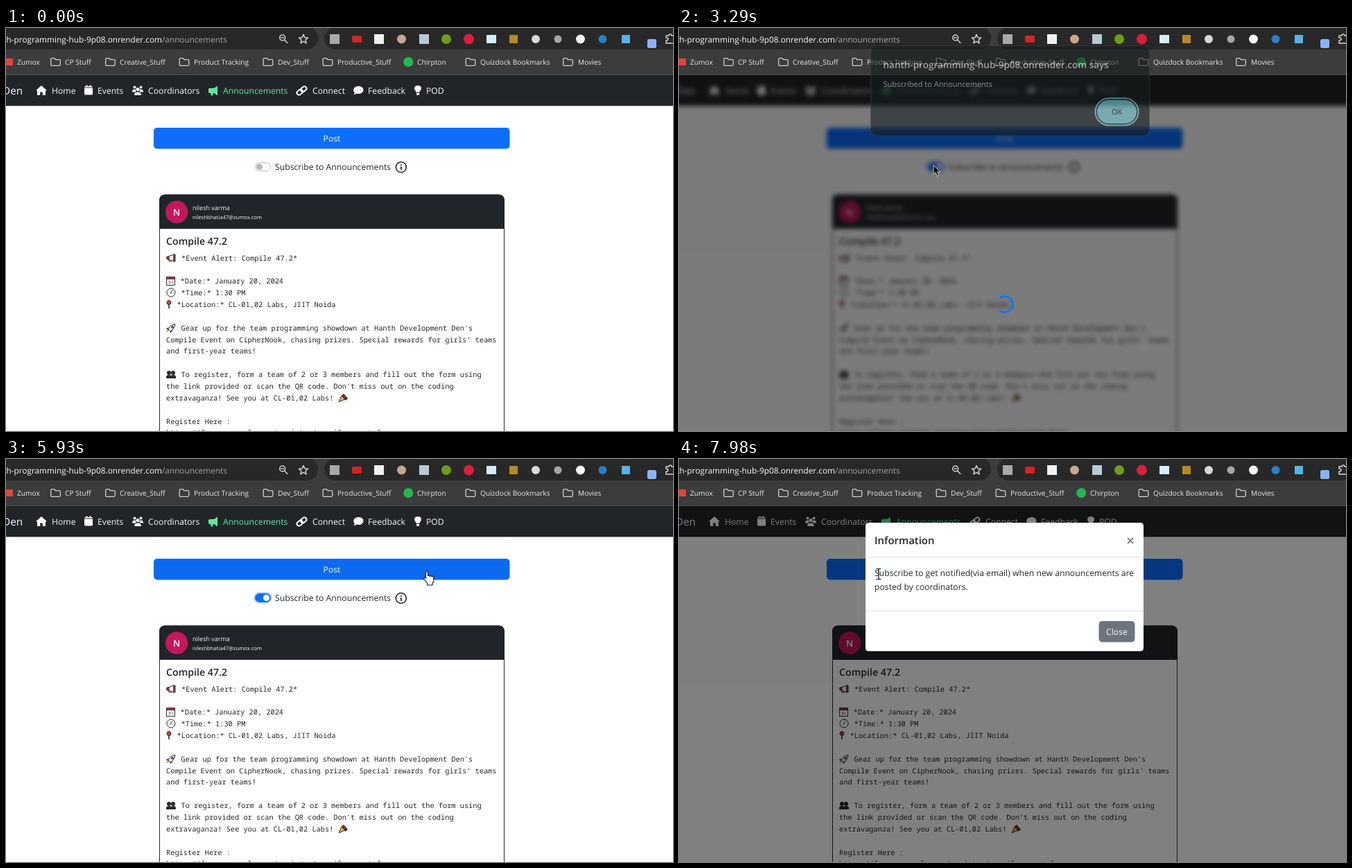
These frames come from a looping animation (962 px wide and 582 px high, 8000 ms). An HTML page:

```html
<!DOCTYPE html>
<html lang="en">
<head>
<meta charset="utf-8">
<title>Announcements</title>
<style>
html, body { margin: 0; width: 100%; height: 100%; overflow: hidden; background: #fff; }
svg.stage { position: fixed; left: 0; top: 0; display: block; }
text { font-family: "Open Sans", "Noto Sans", sans-serif; font-size: 12.2px; fill: #212529; text-rendering: geometricPrecision; }
.mono text { font-family: "Noto Sans Mono", "DejaVu Sans Mono", monospace; font-size: 10.32px; }
.url text { font-size: 11.8px; }
.marks text { font-size: 10.2px; fill: #e8e8e8; }
.nav text, .light { fill: #f8f9fa; }
.semi { font-weight: 600; }
.mid { text-anchor: middle; }
.end { text-anchor: end; }
.line { fill: none; stroke-linecap: round; stroke-linejoin: round; }

/* One shared 8 s clock: 1% = 80 ms */
.page, .track, .knob, .ring, .post, .infoRing, .dim, .busy, .arc, .modal, .alert, .click, .cursor, .arrow, .beam, .hand {
  animation: 8s linear infinite;
}
.page { animation-name: page; }
@keyframes page {
  0%, 27.5% { filter: none; }
  30%, 72.25% { filter: blur(3px); }
  73.5%, 100% { filter: none; }
}
.dim { animation-name: dim; }
@keyframes dim {
  0%, 27.5% { opacity: 0; }
  30%, 72.25% { opacity: .52; }
  73.5%, 84.19% { opacity: 0; }
  86.06%, 100% { opacity: .5; }
}
.busy { animation-name: busy; }
@keyframes busy {
  0%, 27.5% { opacity: 0; }
  29%, 72.25% { opacity: 1; }
  73.5%, 100% { opacity: 0; }
}
.arc { transform-box: fill-box; transform-origin: center; animation-name: spin; }
@keyframes spin { from { transform: rotate(167deg); } to { transform: rotate(3828deg); } }

.track { animation-name: track; }
@keyframes track {
  0%, 25.74% { fill: #fff; stroke: #b5bac0; }
  25.75%, 27.49% { fill: #c9dcf5; stroke: #b9cdea; }
  27.5%, 100% { fill: #0d6efd; stroke: #0d6efd; }
}
.knob { animation-name: knob; }
@keyframes knob {
  0%, 25.74% { fill: #b5bac0; transform: none; }
  25.75%, 27.49% { fill: #a9b6c8; transform: none; }
  27.5% { fill: #fff; transform: none; }
  29.4%, 100% { fill: #fff; transform: translateX(10px); }
}
.ring { animation-name: ring; }
@keyframes ring {
  0%, 27.49% { opacity: 0; }
  27.5%, 83% { opacity: 1; }
  83.01%, 100% { opacity: 0; }
}
.infoRing { animation-name: infoRing; }
@keyframes infoRing { 0%, 83% { opacity: 0; } 83.01%, 100% { opacity: 1; } }
.post { animation-name: post; }
@keyframes post {
  0%, 73.75% { fill: #0d6efd; }
  74.9%, 75.4% { fill: #0b5ed7; }
  76.75%, 100% { fill: #0d6efd; }
}

.alert { animation-name: alert; }
@keyframes alert {
  0%, 39.75% { opacity: 0; transform: translateY(-22px); }
  42.1%, 71.4% { opacity: 1; transform: none; }
  72.5%, 100% { opacity: 0; transform: none; }
}
.modal { animation-name: modalFade, modalDrop; }
@keyframes modalFade { 0%, 86.06% { opacity: 0; } 87.94%, 100% { opacity: 1; } }
@keyframes modalDrop {
  0%, 86.06% { transform: translateY(-40px); animation-timing-function: ease-out; }
  89.8%, 100% { transform: none; }
}

.click { animation-name: click; }
@keyframes click {
  0%, 69.74% { opacity: 0; }
  69.75%, 71.25% { opacity: .8; }
  71.26%, 100% { opacity: 0; }
}
.cursor { animation-name: move; animation-timing-function: ease-in-out; }
@keyframes move {
  0%, 4.12% { transform: translate(583px, 455px); }
  11.25% { transform: translate(352px, 206px); }
  13.75% { transform: translate(367px, 202px); }
  15.5% { transform: translate(367px, 199px); }
  18.8%, 46.25% { transform: translate(367px, 198px); }
  55.75% { transform: translate(296px, 100px); }
  57.5% { transform: translate(300px, 81px); }
  66.25% { transform: translate(616px, 127px); }
  69%, 71.25% { transform: translate(623px, 127px); }
  74.1% { transform: translate(607px, 163px); }
  76.6% { transform: translate(578px, 200px); }
  78.25%, 89.4% { transform: translate(569px, 202px); }
  92.1% { transform: translate(460px, 198px); }
  96.4% { transform: translate(293px, 174px); }
  98.1% { transform: translate(293px, 180px); }
  99.7%, 100% { transform: translate(288px, 166px); }
}
.arrow, .beam, .hand { animation-timing-function: step-end; }
.arrow { animation-name: arrow; }
@keyframes arrow { 0% { opacity: 0; } 8.75% { opacity: 1; } 73.4% { opacity: 0; } 75.25% { opacity: 1; } 90.5%, 100% { opacity: 0; } }
.beam { animation-name: beam; }
@keyframes beam { 0% { opacity: 0; } 4.125% { opacity: 1; } 8.75% { opacity: 0; } 90.5%, 100% { opacity: 1; } }
.hand { animation-name: hand; }
@keyframes hand { 0% { opacity: 0; } 73.4% { opacity: 1; } 75.25%, 100% { opacity: 0; } }
</style>
</head>
<body>
<svg class="stage" width="962" height="582" viewBox="0 0 962 582">
<defs>
  <path id="folder" class="line" d="M.7 2.2q0-1.5 1.5-1.5h3.6l1.8 2h5.2q1.5 0 1.5 1.5v5.6q0 1.5-1.5 1.5H2.2q-1.5 0-1.5-1.5z" stroke="#cfcfcf" stroke-width="1.3"/>
</defs>

<g class="page">
  <path d="M-20 40H982V620H-20z" fill="#fff"/>
  <path d="M-20 40H982V112.5H-20z" fill="#212529"/>
  <g class="nav">
    <text x="24" y="96" class="end" style="font-size:15.2px">Hanth Development Den</text>
    <text x="66" y="95">Home</text>
    <text x="132" y="95">Events</text>
    <text x="205" y="95">Coordinators</text>
    <text x="313" y="95" style="fill:#66e59b">Announcements</text>
    <text x="442" y="95">Connect</text>
    <text x="522" y="95">Feedback</text>
    <text x="606" y="95">POD</text>
  </g>
  <g fill="#fff">
    <path d="M51 83l8 7.2h-2V97h-4.2v-4.5h-3.6V97H45v-6.8h-2z"/>
    <path d="M113 86.5h12V95q0 1.5-1.5 1.5h-9q-1.5 0-1.5-1.5zM113 85.5q0-1.5 1.5-1.5h1v-1.5h2V84h3v-1.5h2V84h1q1.5 0 1.5 1.5z"/>
    <circle cx="185.5" cy="85.5" r="2"/><circle cx="194.5" cy="85.5" r="2"/><circle cx="190" cy="88.5" r="2.5"/>
    <path d="M182 92.5q0-4 3.5-4 1.5 0 2 1-1 1.5 0 3zM198 92.5q0-4-3.5-4-1.5 0-2 1 1 1.5 0 3zM185 97q0-4.5 5-4.5t5 4.5z"/>
    <path fill="#66e59b" d="M292 88.5q0-1.5 1.5-1.5h4q4 0 6.5-3h1v13h-1q-2.5-3-6-3l.8 3.5h-3l-.8-3.5h-1.5q-1.5 0-1.5-1.5z"/>
    <g class="line" stroke="#fff" stroke-width="2" transform="rotate(-38 426.5 90.5)">
      <rect x="418.5" y="87.5" width="9" height="6" rx="3"/><rect x="425.5" y="87.5" width="9" height="6" rx="3"/>
    </g>
    <path d="M508.5 84c9.3 0 9.3 11 0 11q-1.5 0-3-.4-1.6 1.7-4 1.7 1.3-1.5 1.2-3.2c-3.2-3.5-1-9.1 5.8-9.1z"/>
    <path d="M594 83c5.5 0 6 5 3.5 7.5q-1.2 1.2-1.2 2.5h-4.6q0-1.3-1.2-2.5C588 88 588.5 83 594 83zM591.8 94h4.4v1.5l-1 1.5h-2.4l-1-1.5z"/>
  </g>

  <rect class="post" x="213" y="144" width="513.5" height="30.5" rx="5"/>
  <text x="470" y="164" class="mid light">Post</text>

  <rect class="ring" x="358" y="193" width="25" height="15" rx="7.5" fill="none" stroke="#bcd6fe" stroke-width="2"/>
  <rect class="track" x="359.5" y="194.5" width="22" height="12" rx="6"/>
  <circle class="knob" cx="365.5" cy="200.5" r="4.5"/>
  <text x="388" y="205">Subscribe to Announcements</text>
  <rect class="infoRing" x="558" y="186" width="24" height="29" rx="5" fill="none" stroke="#a9d2ee" stroke-width="2.5"/>
  <circle cx="569.8" cy="201" r="7.5" fill="none" stroke="#212529" stroke-width="1.6"/>
  <path d="M569 197h1.7v1.7H569zM569 200h1.7v5H569z" fill="#212529"/>

  <rect x="221.5" y="241" width="497" height="370" rx="8" fill="#fff" stroke="#212529"/>
  <path d="M221 290v-41q0-8.5 8.5-8.5h481q8.5 0 8.5 8.5v41z" fill="#212529"/>
  <circle cx="246.2" cy="265.8" r="16.2" fill="#c2185b"/>
  <text x="246.2" y="270.6" class="mid light semi" style="font-size:13px">N</text>
  <text x="269" y="263" class="light" style="font-size:9px">nilesh varma</text>
  <text x="269" y="275.5" class="light" style="font-size:7.6px">nileshbhatia47@zumox.com</text>
  <text x="231" y="313" class="semi" style="font-size:14.2px">Compile 47.2</text>

  <g class="mono">
    <text x="253" y="335.7">*Event Alert: Compile 47.2*</text>
    <text x="251.5" y="369.4">*Date:* January 20, 2024</text>
    <text x="252.5" y="386.2">*Time:* 1:30 PM</text>
    <text x="246.5" y="403">*Location:* CL-01,02 Labs, JIIT Noida</text>
    <text x="252.5" y="436.7">Gear up for the team programming showdown at Hanth Development Den's</text>
    <text x="231" y="453.6">Compile Event on CipherNook, chasing prizes. Special rewards for girls' teams</text>
    <text x="231" y="470.4">and first-year teams!</text>
    <text x="252.5" y="504.1">To register, form a team of 2 or 3 members and fill out the form using</text>
    <text x="231" y="520.9">the link provided or scan the QR code. Don't miss out on the coding</text>
    <text x="231" y="537.8">extravaganza! See you at CL-01,02 Labs!</text>
    <text x="231" y="571.5">Register Here :</text>
    <text x="231" y="588.3">https://forms.example.org/register/compile-event-form</text>
  </g>

  <g stroke="#2b2b2b" stroke-linejoin="round">
    <path d="M232 330.5l10-3.5v10l-10-3.5z" fill="#f3f3f3"/>
    <path d="M232 330.5l3-1v5l-3-1zM242 327h2v10h-2z" fill="#d8343f"/>
    <path d="M235 334.5v2.5h3.5v-1.5" fill="none"/>
    <rect x="231.5" y="359.5" width="12" height="12" fill="#fff"/>
    <path d="M231.5 359.5h12v3h-12z" fill="#c8323c"/>
    <path d="M234.5 365.5h2v3.5h-2M239.5 365.5v3.5" fill="none" stroke="#666"/>
    <circle cx="238" cy="382" r="6" fill="#fff"/>
    <path d="M238 382l2-3.5M238 382l-1.5 2" fill="none"/>
    <path d="M235 397v8" stroke-width="1.6"/><circle cx="235" cy="396.5" r="3" fill="#d8343f"/>
    <path d="M234 435q2-6 10-7.5-1 7.5-7 10.5z" fill="#e9eef2"/>
    <path d="M234 433l-2.5 1.5 2.5 1M238 438l-1 2 3-3.5" fill="#d8343f"/>
    <circle cx="240" cy="432" r="1.3" fill="#4aa3df"/>
    <path d="M232 438.5l2.5-2" stroke="#f08a24" stroke-width="2"/>
  </g>
  <g fill="#2b2b2b">
    <circle cx="235" cy="498" r="3"/><circle cx="241" cy="498" r="3"/>
    <path d="M231 506v-2q0-3 4-3t4 3v2zM237.5 506v-2q0-3 3.5-3 4 0 4 3v2z"/>
    <path d="M480 540l4-9 5 5z" fill="#f2b632" stroke="#2b2b2b"/>
    <path d="M484 531l3-3 6 7-3.5 3z"/>
    <path d="M487 531l2.5 3" class="line" stroke="#d8343f" stroke-width="1.5"/>
  </g>
</g>

<path class="dim" d="M0 68H962V582H0z"/>

<g class="busy">
  <circle class="arc" cx="470" cy="399" r="11.5" fill="none" stroke="#1a73e8" stroke-width="3" pathLength="360" stroke-dasharray="255 105"/>
</g>

<g class="modal">
  <rect x="269" y="92" width="401" height="185.5" rx="4.5" fill="#fff"/>
  <path d="M269 141.5h401M269 219.5h401" stroke="#dee2e6"/>
  <text x="282" y="122.5" class="semi" style="font-size:14.9px">Information</text>
  <path d="M647.5 114.5l7 7m0-7l-7 7" class="line" stroke="#666" stroke-width="1.7"/>
  <text x="282" y="169">Subscribe to get notified(via email) when new announcements are</text>
  <text x="282" y="188.5">posted by coordinators.</text>
  <rect x="605.5" y="234" width="52" height="30.5" rx="5" fill="#6c757d"/>
  <text x="631.5" y="253.5" class="mid light">Close</text>
</g>

<g class="url">
  <path d="M0 0H962V68H0z" fill="#3c3c3c"/>
  <path d="M0 67.5H962" stroke="#525252"/>
  <rect x="-40" y="-2" width="490" height="33" rx="16" fill="#282828"/>
  <rect x="459" y="-1" width="540" height="32" rx="16" fill="#282828"/>
  <text x="225" y="20.5" class="end light">hanth-programming-hub-9p08.onrender.com</text>
  <text x="225" y="20.5" style="fill:#a5a5a5">/announcements</text>
  <g class="line" stroke="#d5d5d5" stroke-width="1.5">
    <circle cx="398.7" cy="14" r="4"/><path d="M401.8 17.2l4 4.3M397 14h3.5"/>
    <path d="M429 9.5l1.9 4.3 4.7.4-3.6 3.1 1.1 4.6-4.1-2.5-4.1 2.5 1.1-4.6-3.6-3.1 4.7-.4z"/>
    <path d="M964 22h-12v-4q3 0 3-2t-3-2v-3h4q0-2 2-2t2 2h4"/>
  </g>
  <rect x="467" y="9" width="14" height="14" fill="#a9a9a9"/>
  <rect x="499" y="11" width="14" height="10" rx="2" fill="#cf2626"/>
  <rect x="531" y="9" width="14" height="14" fill="#f1f1f1"/>
  <circle cx="570.5" cy="16" r="6.5" fill="#c9a78d"/>
  <rect x="596" y="9" width="14" height="14" fill="#b9cad6"/>
  <circle cx="635" cy="16" r="7" fill="#6f9c1c"/>
  <circle cx="667.5" cy="16" r="7.5" fill="#d81f3c"/>
  <rect x="693" y="10" width="14" height="12" fill="#d4eef3"/>
  <rect x="726" y="10" width="12" height="12" fill="#b58a22"/>
  <circle cx="764" cy="16" r="6" fill="#d9d9d9"/>
  <circle cx="796" cy="16" r="5.5" fill="#a6a6a6"/>
  <circle cx="828.5" cy="16" r="6.5" fill="#f5f5f5"/>
  <circle cx="860.5" cy="16" r="6" fill="#2b7fc4"/>
  <rect x="888" y="10" width="12" height="12" fill="#58b3ea"/>
  <rect x="925" y="16" width="13" height="13" rx="2.5" fill="#8ab4f8"/>
</g>
<g class="marks">
  <rect x="0" y="44" width="10" height="10" fill="#e0443a"/>
  <circle cx="580.3" cy="49" r="7" fill="#25b84f"/>
  <use href="#folder" x="64" y="43"/><use href="#folder" x="143" y="43"/><use href="#folder" x="249.5" y="43"/>
  <use href="#folder" x="370.5" y="43"/><use href="#folder" x="456.5" y="43"/><use href="#folder" x="662.5" y="43"/>
  <use href="#folder" x="803" y="43"/>
  <text x="16" y="53">Zumox</text>
  <text x="85" y="53">CP Stuff</text>
  <text x="164" y="53">Creative_Stuff</text>
  <text x="271" y="53">Product Tracking</text>
  <text x="392" y="53">Dev_Stuff</text>
  <text x="478" y="53">Productive_Stuff</text>
  <text x="593" y="53">Chirpton</text>
  <text x="684" y="53">Quizdock Bookmarks</text>
  <text x="825" y="53">Movies</text>
</g>

<g class="alert">
  <rect x="276.5" y="34.5" width="402" height="130.5" rx="9" fill="#171d1f" stroke="#3d4447"/>
  <text x="294.5" y="67.5" class="semi" style="font-size:13.5px;fill:#e8eaeb">hanth-programming-hub-9p08.onrender.com says</text>
  <text x="294.5" y="94" style="font-size:11px;fill:#e3e6e7">Subscribed to Announcements</text>
  <rect x="600.5" y="110.5" width="62" height="39" rx="19.5" fill="none" stroke="#7bcdd8" stroke-width="2"/>
  <rect x="603" y="113" width="57" height="34" rx="17" fill="#7bcdd8"/>
  <text x="631.5" y="134" class="mid semi" style="font-size:11px;fill:#173f45">OK</text>
</g>

<circle class="click" cx="623" cy="128" r="11" fill="#d2e03a"/>
<g class="cursor">
  <path class="arrow" d="M0 0v13.5l3.1-2.9 2.3 5.4 2.3-1-2.3-5.2h4.3z" stroke="#fff" stroke-width=".8"/>
  <path class="beam line" d="M-3-7.5h2q1 0 1 1 0-1 1-1h2M0-6.5v13M-3 7.5h2q1 0 1-1 0 1 1 1h2" stroke="#111" stroke-width="1.2"/>
  <path class="hand" d="M-1.5 1q0-1.7 1.5-1.7T1.5 1v5q.2-1 1.5-1t1.5 1.3q.3-.8 1.4-.8t1.3 1.3q.4-.5 1.3-.5 1.3 0 1.3 1.5V12q0 3-1.8 4.5V19H.8v-2.5L-4 10.5q-.8-1.3.2-2t2 .2l.3.4z" fill="#fff" stroke="#111" stroke-width="1.1"/>
</g>
</svg>
</body>
</html>
```
